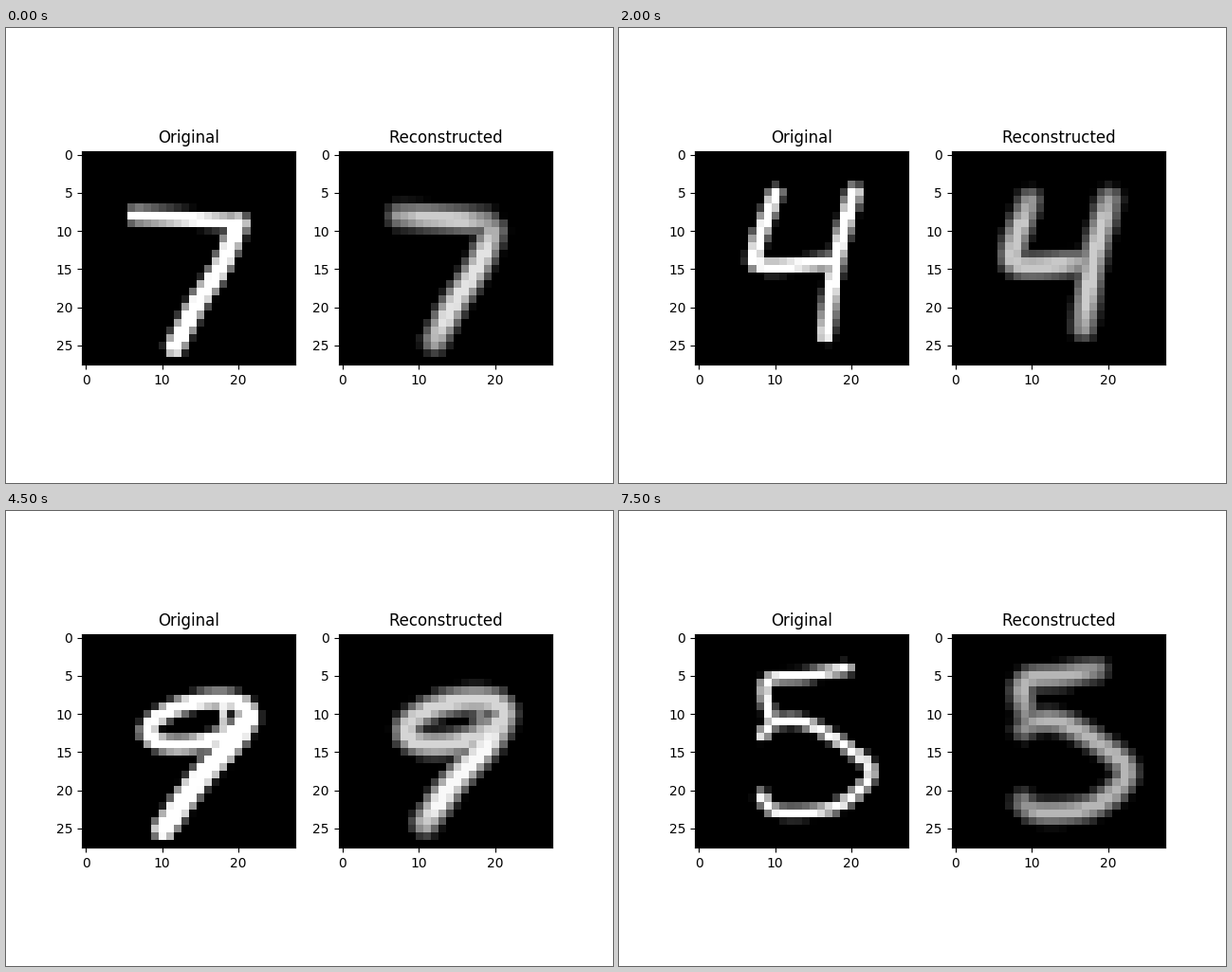
Recreate the animation shown at these times as a matplotlib script. Size 640 px wide and 480 px high, loop 8000 ms.

```python
import numpy as np
import matplotlib.pyplot as plt
from matplotlib.animation import FuncAnimation

plt.rcParams["text.kerning_factor"] = 6

N = 28
STEP = 0.25
ROWS, COLS = np.mgrid[0:N, 0:N]


def even(points):
    """Resample a polyline at equal distances."""
    s = np.r_[0, np.cumsum(np.hypot(*np.diff(points, axis=0).T))]
    at = np.linspace(0, s[-1], int(s[-1] / STEP) + 2)
    return np.column_stack([np.interp(at, s, axis) for axis in points.T])


def path(width, *keys):
    """Catmull-Rom curve through a few key points."""
    p = np.array([keys[0], *keys, keys[-1]], float)
    t = np.linspace(0, 1, 30)[:, None]
    parts = [b + 0.5 * t * (c - a + t * (2 * a - 5 * b + 4 * c - d
                                         + t * (3 * (b - c) + d - a)))
             for a, b, c, d in zip(p, p[1:], p[2:], p[3:])]
    return width, even(np.vstack(parts))


def loop(width, cx, cy, rx, ry, lean):
    """Slanted ellipse, overlapping itself by a quarter turn."""
    t = np.linspace(0, 2.5 * np.pi, 150)
    dy = ry * np.sin(t)
    return width, even(np.column_stack([cx + rx * np.cos(t) - lean * dy, cy + dy]))


def ink(points, width, edge, gain=1.0):
    x, y = points.T[:, :, None, None]
    dist = np.hypot(COLS - x, ROWS - y)
    level = np.clip((width - dist) / edge + 0.5, 0, 1)
    return (np.reshape(gain, (-1, 1, 1)) * level).max(axis=0)


def sharp(strokes):
    return np.max([ink(p, w, 1.0) for w, p in strokes], axis=0)


def soft(strokes):
    """Rounded corners, evened-out widths, thin strokes and ends dimmer."""
    layers = []
    for w, p in strokes:
        k = min(9, len(p) // 2)
        p = np.column_stack([np.convolve(a, np.ones(k) / k, "valid") for a in p.T])
        i = np.arange(len(p))
        to_end = STEP * np.minimum(i, i[::-1])
        fade = 0.75 + 0.25 * np.minimum(1, to_end / 3)
        layers.append(ink(p, 1.1 + 0.3 * w, 1.8, min(1, 0.45 + 0.35 * w) * fade))
    return np.max(layers, axis=0)


digits = [
    # 7
    [path(1, (6.5, 8), (13, 8.4), (19.8, 8.9)),
     path(1.25, (20, 9), (17.8, 14.5), (14.3, 20), (11.6, 25.2))],
    # 2
    [path(1.3, (8.3, 6.3), (13, 4.2), (16, 7.5), (12, 14), (9, 19.6)),
     path(1.1, (9, 20.3), (15, 21), (24.5, 20.2))],
    # 1
    [path(1, (16.2, 4.6), (11.7, 22.8))],
    # 0
    [loop(1.75, 14.3, 14.7, 5.8, 6.4, 0.24), path(1.5, (14.3, 5), (14, 8))],
    # 4
    [path(0.95, (10, 5.2), (7.6, 12), (8.4, 14.6), (17.8, 14)),
     path(1, (20.3, 5), (18, 14), (16.6, 23.6))],
    # 1
    [path(1.25, (17, 5), (12, 22.5))],
    # 4
    [path(1, (10.6, 5.3), (7.6, 10.5), (7.6, 13.2), (17, 13)),
     path(1.05, (22, 5.3), (17.2, 13.8), (14.1, 21), (14.3, 23.5), (17.4, 22.3))],
    # 9
    [loop(0.95, 12.6, 11.5, 2.9, 2.9, 0.2),
     path(1, (15.3, 9.5), (16, 15), (17.3, 19.5), (20.2, 24))],
    # 5
    [path(1.25, (22.5, 6), (13.5, 7.2), (10, 12.8)),
     path(1.3, (10, 13), (17.6, 16), (13.5, 22.2), (7, 20.5), (8.6, 17.4))],
    # 9
    [loop(1.1, 14.7, 11.1, 6, 3, 0.9), path(0.5, (18, 8.5), (18.3, 12.5)),
     path(1.5, (21.2, 10.5), (19, 14), (14.5, 19), (10.2, 25))],
    # 0
    [loop(1.4, 14, 14, 6, 7.8, 0.12)],
    # 6
    [path(0.95, (12.2, 3.6), (8.7, 11), (8.3, 18.5), (13, 21.2), (20, 18),
          (21.2, 12), (17.5, 10.2), (12.2, 15), (14.4, 18))],
    # 9
    [loop(1.2, 13.5, 11.8, 4.4, 3.3, 0.5),
     path(1.25, (18.3, 9), (17.4, 15), (15, 25.2))],
    # 0
    [loop(1.3, 14.6, 15, 5.9, 8.5, 0.09)],
    # 1
    [path(1.05, (16, 5.2), (13, 22.6))],
    # 5
    [path(0.75, (19.4, 4.1), (14, 5.1), (8.8, 5.9), (9.5, 11)),
     path(0.75, (8.3, 12.8), (9.8, 11.2), (14, 11.2), (20, 14.8), (22.4, 18),
          (18, 22.1), (10.5, 22.8), (8.2, 20.8))],
]
pairs = [(sharp(d), soft(d)) for d in digits]

fig, axes = plt.subplots(1, 2, figsize=(6.4, 4.8), dpi=100)
views = []
for ax, title in zip(axes, ("Original", "Reconstructed")):
    views.append(ax.imshow(np.zeros((N, N)), cmap="gray", vmin=0, vmax=1))
    ax.set_title(title)


def update(i):
    for view, img in zip(views, pairs[i]):
        view.set_data(img)
    return views


anim = FuncAnimation(fig, update, frames=len(pairs), interval=500, repeat=True)
plt.show()
```
